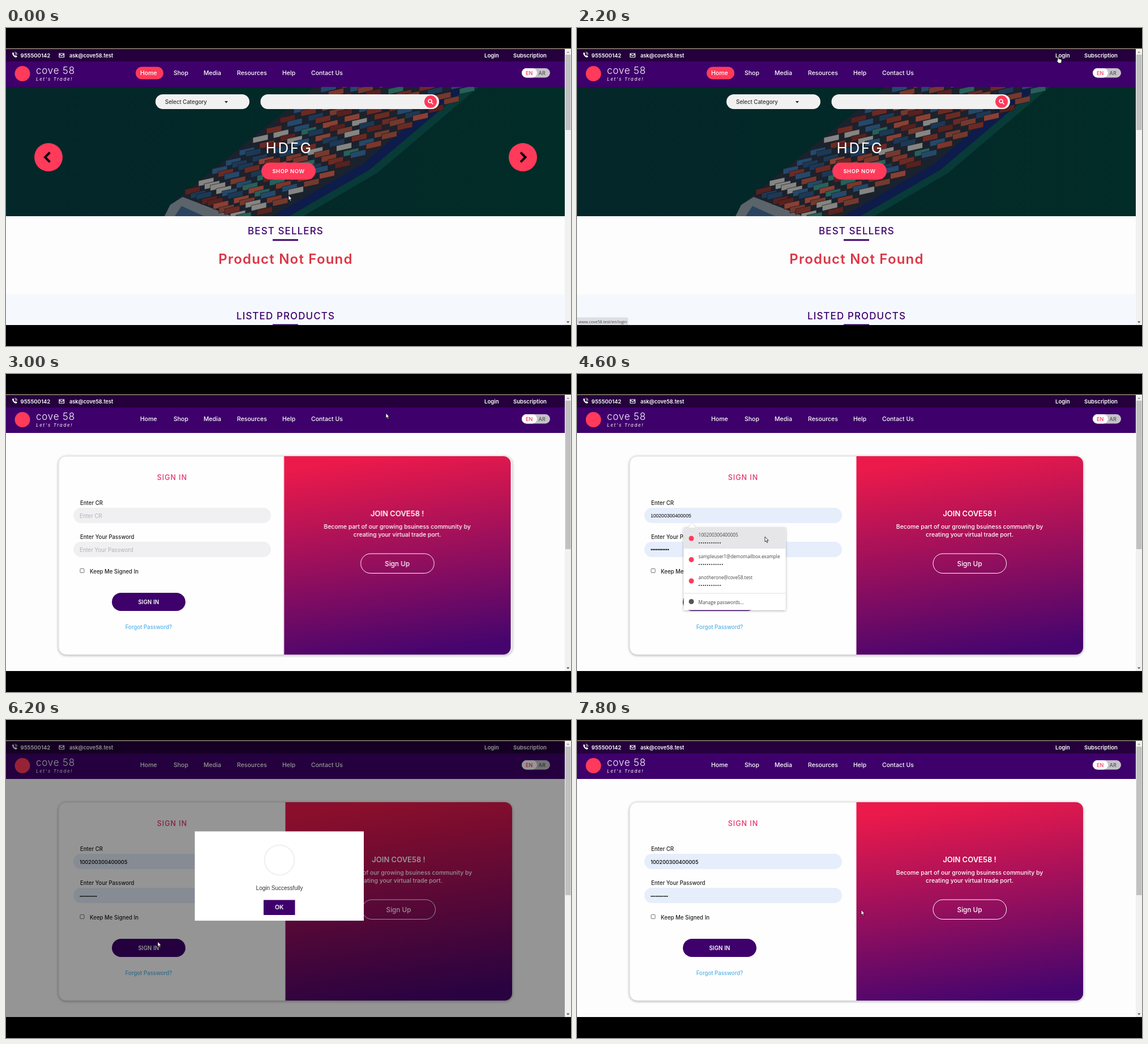
An HTML page that plays this animation: 998x561 px, repeating every 8 s.

```html
<!DOCTYPE html>
<html lang="en">
<head>
<meta charset="utf-8">
<title>Sign in walkthrough</title>
<style>
html, body { margin: 0; width: 100%; height: 100%; overflow: hidden; background: #000; }
svg { display: block; width: 100%; height: 100%; }
text { font: 500 9.65px Inter, sans-serif; dominant-baseline: central; white-space: pre; }
.mid text, text.mid { text-anchor: middle; }
.nav text { font-size: 10.5px; fill: #fff; }
.top text { font-size: 9.6px; font-weight: 600; fill: #fff; }
.heading { font-size: 17px; letter-spacing: 1.1px; fill: #3e006b; }
.arial { font: 400 10px "Liberation Sans", Arial, sans-serif; }
.menu text { font: 400 8.2px "Open Sans", "Noto Sans", sans-serif; fill: #444; }
.menu .dots { font: 700 8px "Liberation Sans", sans-serif; letter-spacing: .9px; }
.pink { fill: #ff3a5a; }
.purple { fill: #3e006b; }

/* scene timing: one 200 ms beat is 2.5% of the loop */
.beat { opacity: 0; animation: 8s step-end infinite; }
.home { animation-name: home; }
.slider { animation-name: slider; }
.login { animation-name: login; }
.link { animation-name: link; }
.blank { animation-name: blank; }
.menu { animation-name: menu; }
.preview { animation-name: preview; }
.filled { animation-name: filled; }
.pressed { animation-name: pressed; }
.modal { animation-name: modal; }
.hand { animation-name: hand; }
.arrow { animation-name: arrow; }
.panel { animation: panel 8s step-end infinite; }
.pointer { animation: pointer 8s infinite; }
.check { stroke-dasharray: 1 2; animation: check 8s infinite; }

@keyframes home { 0% { opacity: 1 } 32.5%, 100% { opacity: 0 } }
@keyframes slider { 0% { opacity: 1 } 12.5%, 100% { opacity: 0 } }
@keyframes login { 0% { opacity: 0 } 32.5%, 100% { opacity: 1 } }
@keyframes link { 0%, 32.5%, 100% { opacity: 0 } 17.5% { opacity: 1 } }
@keyframes blank { 0% { opacity: 1 } 55%, 100% { opacity: 0 } }
@keyframes menu { 0%, 60%, 100% { opacity: 0 } 47.5% { opacity: 1 } }
@keyframes preview { 0%, 60%, 100% { opacity: 0 } 55% { opacity: 1 } }
@keyframes filled { 0% { opacity: 0 } 60%, 100% { opacity: 1 } }
@keyframes pressed { 0%, 77.5%, 100% { opacity: 0 } 70% { opacity: 1 } }
@keyframes modal { 0%, 92.5%, 100% { opacity: 0 } 77.5% { opacity: 1 } }
@keyframes hand { 0%, 32.5%, 77.5%, 92.5%, 100% { opacity: 0 } 15%, 70%, 87.5% { opacity: 1 } }
@keyframes arrow { 0%, 32.5%, 77.5%, 92.5%, 100% { opacity: 1 } 15%, 70%, 87.5% { opacity: 0 } }
@keyframes panel { 0%, 40%, 100% { transform: none } 32.5% { transform: translateX(-2.4px) } }
@keyframes check {
  0%, 77.5% { stroke-dashoffset: 1; animation-timing-function: steps(4) }
  87.5%, 100% { stroke-dashoffset: 0 }
}
@keyframes pointer {
  0% { transform: translate(499px, 295px); animation-timing-function: steps(6) }
  15%, 30% { transform: translate(848px, 50px); animation-timing-function: steps(3) }
  37.5% { transform: translate(671px, 69px); animation-timing-function: steps(3) }
  45%, 47.5% { transform: translate(214px, 249px); animation-timing-function: steps(4) }
  57.5%, 60% { transform: translate(332px, 287px); animation-timing-function: steps(4) }
  70%, 77.5% { transform: translate(268px, 391px); animation-timing-function: steps(4) }
  87.5%, 92.5% { transform: translate(487px, 330px); animation-timing-function: steps(2) }
  97.5%, 100% { transform: translate(502px, 335px) }
}
</style>
</head>
<body>
<svg viewBox="0 0 998 561" preserveAspectRatio="none">
  <defs>
    <linearGradient id="sea"><stop stop-color="#04272a"/><stop offset=".4" stop-color="#032828"/><stop offset="1" stop-color="#022c27"/></linearGradient>
    <linearGradient id="berry" x1=".42" y1="0" x2=".58" y2="1"><stop stop-color="#ec1a4b"/><stop offset="1" stop-color="#46056e"/></linearGradient>
    <clipPath id="hero"><path d="M0 104H987V332H0Z"/></clipPath>
    <filter id="soft" x="-10%" y="-10%" width="120%" height="120%"><feDropShadow dx="0" dy="1" stdDeviation="2" flood-opacity=".35"/></filter>
  </defs>
  <rect width="998" height="561"/>
  <rect y="37" width="987" height="487" fill="#fdfdfd"/>

  <g class="beat home">
    <g clip-path="url(#hero)">
      <rect y="104" width="987" height="228" fill="url(#sea)"/>
      <path d="M500 332 642 250 815 104H835L655 256 525 332Z" fill="#0d4643" opacity=".6"/>
      <path d="M278 332 302 302 545 104H815L642 250 500 332Z" fill="#1a222e"/>
      <path d="M500 332 642 250 815 104H790L630 240 470 332Z" fill="#0d1c4a"/>
      <path d="M280 332 290 312 312 298 400 332Z" fill="#5b646b"/>
      <path d="M298 332 310 314 350 332Z" fill="#2a4460"/>
      <g id="cargo"></g>
    </g>
    <rect x="264" y="117" width="166" height="26" rx="13" fill="#f1f1f1"/>
    <text x="281" y="130.5" fill="#333">Select Category</text>
    <path d="M386 129h6l-3 3.5Z" fill="#222"/>
    <rect x="449.5" y="117" width="315.5" height="26" rx="13" fill="#f1f1f1"/>
    <circle class="pink" cx="750" cy="130" r="11"/>
    <g fill="none" stroke="#fff" stroke-width="1.6"><circle cx="749" cy="129" r="3"/><path d="m751.5 131.5 3 3"/></g>
    <g class="beat slider">
      <g class="pink"><circle cx="75" cy="228" r="25"/><circle cx="913" cy="228" r="25"/></g>
      <path d="m77.500 219.500-8.500 8.500 8.500 8.500M909 219.500l8.500 8.500-8.500 8.500" fill="none" stroke="#0c0710" stroke-width="4"/>
    </g>
    <rect class="pink" x="451" y="237.5" width="96" height="30" rx="15"/>
    <g class="mid">
      <text x="500" y="211.5" fill="#fff" style="font-size:26px;font-weight:400;letter-spacing:2.5px">HDFG</text>
      <text x="499" y="252.5" fill="#fff" style="font-size:9.4px;font-weight:600;letter-spacing:.6px">SHOP NOW</text>
      <text class="heading" x="494" y="357.5">BEST SELLERS</text>
      <text x="494" y="407.5" fill="#dc3545" style="font-size:24px;font-weight:600;letter-spacing:1.2px">Product Not Found</text>
    </g>
    <rect class="purple" x="471" y="372.5" width="45" height="3"/>
    <rect y="470" width="987" height="54" fill="#f5f9fe"/>
    <text class="heading mid" x="494" y="508">LISTED PRODUCTS</text>
    <rect class="purple" x="471" y="522.5" width="45" height="1.5"/>
  </g>

  <g class="beat login">
    <rect x="93" y="145" width="801" height="350" rx="13" fill="#fefefe" stroke="#ddd" filter="url(#soft)"/>
    <text class="mid" x="293.5" y="182.5" fill="#e6336a" style="font-size:12.5px;letter-spacing:1px">SIGN IN</text>
    <g fill="#222">
      <text x="131" y="227">Enter CR</text>
      <text x="131" y="287.5">Enter Your Password</text>
      <text x="148" y="348">Keep Me Signed In</text>
    </g>
    <rect x="131" y="343.5" width="7" height="7" rx="1" fill="#fff" stroke="#666" stroke-width=".9"/>
    <g fill="#f0f0f2"><rect x="119" y="236" width="349" height="27" rx="13.5"/><rect x="119" y="296" width="349" height="27" rx="13.5"/></g>
    <g class="beat blank" fill="#b2b2b8">
      <text x="130" y="250" style="font-weight:400">Enter CR</text>
      <text x="130" y="310" style="font-weight:400">Enter Your Password</text>
    </g>
    <g class="beat preview">
      <g fill="#e6eefc"><rect x="119" y="236" width="349" height="27" rx="13.5"/><rect x="119" y="296" width="349" height="27" rx="13.5"/></g>
      <text class="arial" x="130" y="250" style="font-size:8.6px">100200300400005</text>
      <text class="arial" x="130" y="310" style="font-size:8.5px">•••••••••••</text>
    </g>
    <g class="beat filled">
      <g fill="#e6eefc"><rect x="119" y="236" width="349" height="27" rx="13.5"/><rect x="119" y="296" width="349" height="27" rx="13.5"/></g>
      <text x="130" y="250" style="font-size:9px">100200300400005</text>
      <text class="arial" x="130" y="310" style="font-size:8px">•••••••••••</text>
    </g>
    <rect class="purple" x="187" y="386" width="130" height="32" rx="16"/>
    <text class="mid" x="252" y="402" fill="#fff" style="font-weight:600;letter-spacing:.2px">SIGN IN</text>
    <g class="beat pressed">
      <rect x="187.7" y="386.7" width="128.6" height="30.6" rx="15.3" fill="#fff" stroke="#3e006b" stroke-width="1.5"/>
      <text class="mid" x="252" y="402" fill="#1d0b2b" style="font-weight:600;letter-spacing:.2px">SIGN IN</text>
    </g>
    <text class="mid" x="252" y="446" fill="#55b2e8">Forgot Password?</text>

    <g class="panel mid" fill="#fff">
      <path d="M493.5 145H881a13 13 0 0 1 13 13V482a13 13 0 0 1-13 13H493.5Z" fill="url(#berry)"/>
      <text x="693.5" y="245.5" style="font-size:13px;font-weight:600">JOIN COVE58 !</text>
      <text x="693.5" y="269" style="font-size:10.4px">Become part of our growing bsuiness community by</text>
      <text x="693.5" y="283.5" style="font-size:10.4px">creating your virtual trade port.</text>
      <rect x="629" y="317" width="129.5" height="34.5" rx="17.2" fill="none" stroke="#fff"/>
      <text x="693.5" y="334.5" style="font-size:11.7px">Sign Up</text>
    </g>

    <g class="beat menu">
      <path d="M188.5 271H197l6-7 6 7H368.5V416.5H188.5Z" fill="#fff" filter="url(#soft)"/>
      <rect class="beat preview" x="188.5" y="271" width="180" height="37" fill="#e6e6e9"/>
      <g class="pink"><circle cx="202" cy="290" r="4.5"/><circle cx="202" cy="327.5" r="4.5"/><circle cx="202" cy="365" r="4.5"/></g>
      <text x="214.5" y="283">100200300400005</text><text class="dots" x="214.5" y="297">•••••••••••</text>
      <text x="214.5" y="321">sampleuser1@demomailbox.example</text><text class="dots" x="214.5" y="335">••••••••••••</text>
      <text x="214.5" y="358.5">anotherone@cove58.test</text><text class="dots" x="214.5" y="372.5">•••••••••••</text>
      <path d="M188.5 387H368.5" stroke="#ddd"/>
      <circle cx="202" cy="401.5" r="4.5" fill="#555"/>
      <text x="214.5" y="402">Manage passwords...</text>
    </g>
  </g>

  <rect y="36" width="998" height="1" fill="#cbb9a4"/>
  <g class="top">
    <rect y="37" width="987" height="22" fill="#25003d"/>
    <path d="M12 43c-3 2 2 9 6 9l2-2-3-2-1.500 1-2-3 1-1.500Z" fill="#fff"/>
    <path d="M15.500 42.500q4 .5 4 4.500M16 45q1.500 0 1.500 2" fill="none" stroke="#fff"/>
    <text x="25.5" y="48">955500142</text>
    <path d="M94 45h8.500v6.500H94Zm0 1 4.200 3 4.300-3" fill="none" stroke="#fff" stroke-width="1.2"/>
    <text x="112" y="48" style="font-size:9.2px">ask@cove58.test</text>
    <text x="845" y="48">Login</text>
    <text x="896" y="48">Subscription</text>
  </g>
  <g class="nav">
    <rect class="purple" y="59" width="987" height="45"/>
    <circle class="pink" cx="29" cy="80.5" r="13.5"/>
    <text x="53" y="75" style="font-size:17px;font-weight:300;letter-spacing:.8px">cove 58</text>
    <text x="53" y="90" style="font-size:8px;font-style:italic;font-weight:400;letter-spacing:1.7px">Let's Trade!</text>
    <rect class="pink beat home" x="229" y="68.5" width="49" height="22" rx="11"/>
    <text x="237" y="79.5">Home</text>
    <text x="296" y="79.5">Shop</text>
    <text x="349" y="79.5">Media</text>
    <text x="408" y="79.5">Resources</text>
    <text x="488" y="79.5">Help</text>
    <text x="539" y="79.5">Contact Us</text>
    <rect x="911" y="71" width="50" height="16.5" rx="8.2" fill="#c5c2c9"/>
    <rect x="911" y="71" width="27" height="16.5" rx="8.2" fill="#fff"/>
    <text x="918" y="79.5" style="font-size:9px;fill:#f0355a">EN</text>
    <text x="940.5" y="79.5" style="font-size:9px;fill:#555">AR</text>
  </g>

  <g class="beat modal">
    <rect y="37" width="987" height="487" opacity=".41"/>
    <rect x="333.5" y="196.5" width="298.5" height="157.5" fill="#fff"/>
    <circle cx="483" cy="247" r="26.3" fill="none" stroke="#f3f1f2" stroke-width="2.5"/>
    <path class="check" pathLength="1" d="m468 247 11 11 21-21.500" fill="none" stroke="#a5dc86" stroke-width="3.4"/>
    <text class="arial mid" x="483" y="296" fill="#333">Login Successfully</text>
    <rect class="purple" x="455" y="317.5" width="55.5" height="26.5"/>
    <text class="mid" x="482.7" y="330" fill="#fff" style="font-size:10.5px;font-weight:600">OK</text>
  </g>

  <rect x="987" y="37" width="11" height="487" fill="#f1f1f1"/>
  <rect class="beat home" x="988" y="47" width="9.5" height="133" fill="#c1c1c1"/>
  <rect class="beat login" x="988" y="47" width="9.5" height="262" fill="#c1c1c1"/>
  <path d="m990 44 2.700-3 2.700 3Z" fill="#a3a3a3"/>
  <path d="m990 517.500 2.700 3 2.700-3Z" fill="#505050"/>

  <g class="beat link">
    <path d="M0 510.500H88a2.500 2.500 0 0 1 2.500 2.500V524H0Z" fill="#dedfe3"/>
    <text x="3" y="518" fill="#444" style="font:400 7.1px 'Open Sans',sans-serif">www.cove58.test/en/login</text>
  </g>

  <g class="pointer" fill="#fff" stroke="#111" stroke-width=".8" stroke-linejoin="round">
    <path class="beat arrow" d="M0 0V9L2 7.200 3.600 10.500 5 9.800 3.500 6.700H6.200Z"/>
    <path class="beat hand" d="M1 1.200q1-1.400 2 0V5l1-.5 1 .5 1-.3.800.8 1.200.3V9L7 12H2.500L-.5 8q-.5-1.500 1.500-.5Z"/>
  </g>
</svg>
<script>
// Deck cargo: seeded containers in staggered bays that widen toward the stern.
const paints = ['#6b2a24', '#7d3529', '#57211f', '#73392f', '#8a4034', '#1c3854', '#25486a', '#27605a', '#858583'];
let seed = 17;
const random = () => (seed = seed * 16807 % 2147483647) / 2147483647;
const cargo = document.getElementById('cargo');
for (let bay = 15; bay >= 0; bay--) {
  const spread = 10 + bay * .35;
  for (let row = 0; row < 11; row++) {
    const x = 316 + bay * 24 + row * spread;
    const y = 283 - bay * 18 + row * spread / 2 + random() * 5;
    const box = document.createElementNS(cargo.namespaceURI, 'path');
    box.setAttribute('d', `M${x} ${y}l27 -6v10l-27 6Z`);
    box.setAttribute('fill', paints[Math.floor(random() * paints.length)]);
    box.setAttribute('stroke', '#1a1a1e');
    box.setAttribute('stroke-width', .7);
    cargo.append(box);
  }
}
</script>
</body>
</html>
```
